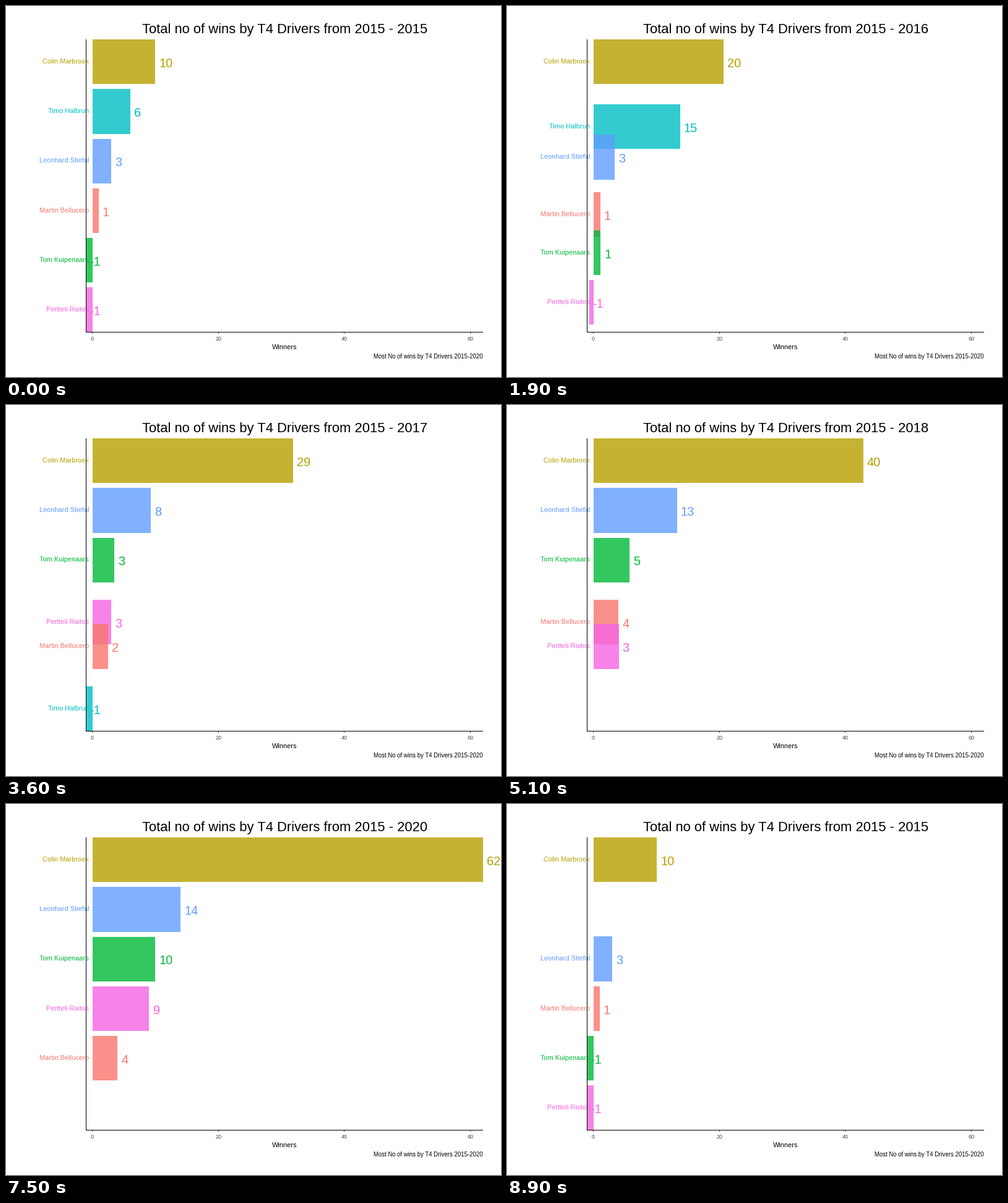
Animation, 800 px wide and 600 px high, one loop 9000 ms. Source, as a matplotlib script:

```python
import matplotlib.pyplot as plt
from matplotlib.animation import FuncAnimation
from matplotlib.patches import Rectangle

plt.rcParams["font.family"] = "Liberation Sans"

W, H, DPI = 800, 600, 100
STEPS = 15                       # frames from one season to the next
YEARS = range(2015, 2021)
LEFT, RIGHT, TOP, BASE = 129, 771, 54.2, 527.2
ZERO, UNIT = 139.6, 10.182       # x of zero wins, pixels per win
ROW = (BASE - TOP) / 5.9
BAR = 0.9 * ROW

# name: colour, wins per season, rank per season (None: not in the chart)
DRIVERS = {
    "Colin Marbrook": ("#B79F00", (10, 20, 29, 40, 51, 62), (1, 1, 1, 1, 1, 1)),
    "Timo Halbrun": ("#00BFC4", (6, 15, -1, None, None, None), (2, 2, 6, None, None, None)),
    "Leonhard Stiefal": ("#619CFF", (3, 3, 8, 13, 14, 14), (3, 3, 2, 2, 2, 2)),
    "Martin Bellucero": ("#F8766D", (1, 1, 2, 4, 4, 4), (4, 4, 5, 4, 5, 5)),
    "Tom Kuipenaars": ("#00BA38", (-1, 1, 3, 5, 8, 10), (5, 5, 3, 3, 3, 3)),
    "Pertteli Raitos": ("#F564E3", (-1, -1, 3, 3, 7, 9), (6, 6, 4, 5, 4, 4)),
}

fig = plt.figure(figsize=(W / DPI, H / DPI), dpi=DPI, facecolor="white")
ax = fig.add_axes([0, 0, 1, 1])
ax.set_xlim(0, W)
ax.set_ylim(H, 0)
ax.axis("off")


def x_of(wins):
    return ZERO + UNIT * wins


def label(x, y, text, size, color="black", ha="center", z=5):
    return ax.text(x, y, text, fontsize=size * 72 / DPI, color=color,
                   ha=ha, va="baseline", zorder=z)


def block(x, y, w, h, color, **kw):
    return ax.add_patch(Rectangle((x, y), w, h, facecolor=color, linewidth=0, **kw))


def ease(t):
    return 4 * t ** 3 if t < 0.5 else 1 - 4 * (1 - t) ** 3


class Runner:
    def __init__(self, name, color, wins, ranks):
        self.wins, self.ranks = wins, ranks
        self.bar = block(ZERO, TOP, 0, BAR, color, alpha=0.8)
        self.name = label(134, 0, name, 11, color, "right", 2)
        self.count = label(0, 0, "", 20, color, "left", 3)

    def update(self, k, t):
        nxt = (k + 1) % len(YEARS)
        shown = self.wins[k] is not None
        for part in (self.bar, self.name, self.count):
            part.set_visible(shown)
        if not shown:
            return
        if self.wins[nxt] is None:
            nxt = k
        u = ease(t)
        wins = self.wins[k] + (self.wins[nxt] - self.wins[k]) * u
        rank = self.ranks[k] + (self.ranks[nxt] - self.ranks[k]) * u
        top = TOP + ROW * (rank - 1)
        mid = top + BAR / 2
        end = x_of(wins)
        self.bar.set_bounds(min(ZERO, end), top, abs(end - ZERO), BAR)
        self.bar.set_zorder(1 + 0.1 * self.ranks[k])
        self.name.set_y(mid + 2.8)
        self.count.set_position((end + 6, mid + 8.8))
        self.count.set_text(str(self.wins[k if t < 0.5 else nxt]))


runners = [Runner(name, *data) for name, data in DRIVERS.items()]

title = label(450.4, 44, "", 22)
label(450, 555, "Winners", 11)
label(RIGHT, 570, "Most No of wins by T4 Drivers 2015-2020", 9.6, ha="right")

block(LEFT, TOP, 1, BASE + 1 - TOP, "black", zorder=4)
block(LEFT, BASE, RIGHT - LEFT, 1, "black", zorder=4)
for tick in range(0, 61, 20):
    block(round(x_of(tick) - 0.5), BASE + 1, 1, 2, "#333333", zorder=4)
    label(x_of(tick), 541, str(tick), 9, "#4D4D4D")


def draw(frame):
    k, step = divmod(frame, STEPS)
    t = step / STEPS
    year = YEARS[(k + (t >= 0.5)) % len(YEARS)]
    title.set_text(f"Total no of wins by T4 Drivers from 2015 - {year}")
    for runner in runners:
        runner.update(k, t)
    return []


anim = FuncAnimation(fig, draw, frames=STEPS * len(YEARS), interval=100,
                     repeat=True, repeat_delay=0)
plt.show()
```
